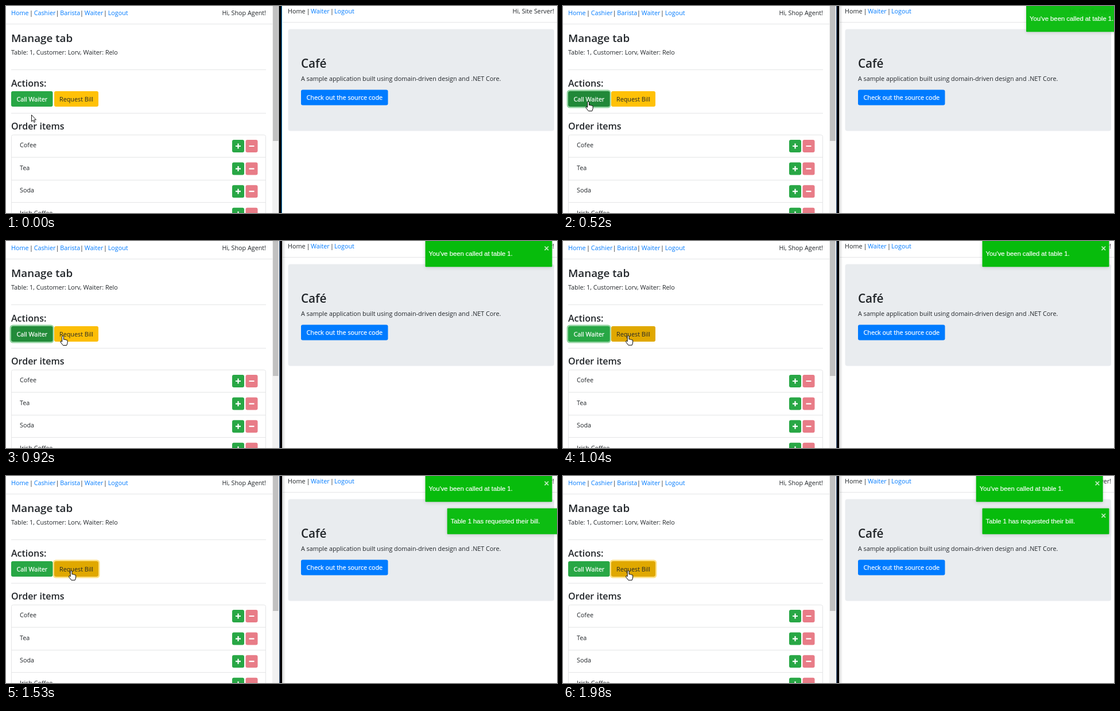
Animation, 960 px wide and 362 px high, one loop 2060 ms. Source, as an HTML page:

```html
<!DOCTYPE html>
<html lang="en">
<head>
<meta charset="utf-8">
<title>Café notifications</title>
<style>
  html, body { margin: 0; width: 100%; height: 100%; overflow: hidden; background: #fff; }
  svg { display: block; width: 960px; height: 362px; }
  text { font: 10.78px "Open Sans", "Noto Sans", sans-serif; fill: #212529; white-space: pre; }
  .h { font-weight: 600; }
  .h3 { font-size: 18.8px; }
  .h4 { font-size: 16px; }
  .h2 { font-size: 20.7px; }
  .link { fill: #007bff; }
  .light { fill: #fff; stroke: #fff; stroke-width: .25; }
  .end { text-anchor: end; }
  .mid { text-anchor: middle; }
  .rule { stroke: #e4e5e6; fill: none; }
  .toast { filter: drop-shadow(0 1px 3px rgba(0, 0, 0, .16)); }
  .toast text { font: 11.25px "Liberation Sans", Arial, sans-serif; fill: #fff; stroke: #fff; stroke-width: .2; }
  .toast path { stroke: #fff; stroke-width: 1.7; opacity: .75; }
  .cursor path { fill: #fff; stroke: #000; stroke-width: .9; stroke-linejoin: round; }
</style>
</head>
<body>
<svg viewBox="0 0 960 362">
  <linearGradient id="shade">
    <stop stop-opacity=".18"/>
    <stop offset="1" stop-opacity="0"/>
  </linearGradient>
  <rect width="960" height="362" fill="#fff"/>

  <!-- customer window -->
  <g id="leftNav"></g>
  <text class="end" x="453" y="16">Hi, Shop Agent!</text>
  <path class="rule" d="M0 31.5H464M9 111.5H453M9 187.5H453"/>
  <text class="h h3" x="9" y="63">Manage tab</text>
  <text x="9" y="85">Table: 1, Customer: Lorv, Waiter: Relo</text>
  <text class="h h4" x="9" y="140.5">Actions:</text>
  <rect id="callRing" x="7.8" y="147.8" width="74.4" height="29.4" rx="4" fill="none" stroke="#28a745" stroke-width="2.4"/>
  <rect id="billRing" x="82.8" y="147.8" width="79.4" height="29.4" rx="4" fill="none" stroke="#ffc107" stroke-width="2.4"/>
  <rect id="call" x="9" y="149" width="72.5" height="27" rx="3"/>
  <rect id="bill" x="84" y="149" width="77" height="27" rx="3"/>
  <text class="light mid" x="45.3" y="167">Call Waiter</text>
  <text class="mid" x="122.5" y="167">Request Bill</text>
  <text class="h h4" x="9" y="216">Order items</text>
  <rect class="rule" x="9.5" y="225.5" width="443" height="160" rx="3"/>
  <g id="items"></g>
  <rect x="464" width="13" height="362" fill="#f1f1f1"/>
  <rect x="465" width="9.5" height="236" fill="#c1c1c1"/>

  <!-- waiter window -->
  <g id="rightNav"></g>
  <text class="end" x="955" y="13">Hi, Site Server!</text>
  <path class="rule" d="M482 28.5H960"/>
  <rect x="491.5" y="40.5" width="463.5" height="178" rx="4" fill="#e9ecef"/>
  <text class="h h2" x="514" y="108">Café</text>
  <text x="514" y="131">A sample application built using domain-driven design and .NET Core.</text>
  <rect x="514" y="146.5" width="151.5" height="27" rx="3" fill="#007bff"/>
  <text class="light mid" x="589.8" y="164">Check out the source code</text>

  <rect id="shadow" x="481" width="6" height="362" fill="url(#shade)"/>
  <rect id="gap" width="4.5" height="362"/>
  <rect id="edge" width="1" height="362"/>

  <g id="toast1" class="toast">
    <rect y="-1" width="221" height="46.3" rx="1" fill="#07bc0c"/>
    <text x="6" y="26">You've been called at table 1.</text>
    <path d="m208 9.5 6.6 6.6m0-6.6-6.6 6.6"/>
  </g>
  <g id="toast2" class="toast">
    <rect y="56.5" width="221" height="45.3" rx="1" fill="#07bc0c"/>
    <text x="6" y="82.5">Table 1 has requested their bill.</text>
    <path d="m208 66 6.6 6.6m0-6.6-6.6 6.6"/>
  </g>

  <circle id="press" r="8" fill="#ffff00" opacity=".55"/>
  <g id="cursor" class="cursor">
    <path id="arrow" d="M0 0V11.5L2.7 9.2 4.4 13 6.2 12.2 4.5 8.5H8Z"/>
    <path id="hand" transform="translate(.6 .4) scale(1.1)" d="M-1.3 9V1a1.3 1.3 0 0 1 2.6 0V5.6q1.2-.9 2.2.3 1.2-.7 2 .5 1.8-.5 1.8 1.2V11L6 14.8H.3L-3.6 9.8Q-4.2 8-2.6 8Z"/>
  </g>
</svg>
<script>
const $ = id => document.getElementById(id);
const LOOP = 2060, SCALE = .711, REST_X = 730.5;

// Page furniture
function nav(id, y, links, bars) {
  $(id).innerHTML =
    links.map(([x, label, plain]) => `<text class="${plain ? '' : 'link'}" x="${x}" y="${y}">${label}</text>`).join('') +
    bars.map(x => `<text class="mid" x="${x}" y="${y}">|</text>`).join('');
}
nav('leftNav', 16, [[9, 'Home'], [48.7, 'Cashier'], [94.3, 'Barista'], [136.7, 'Waiter'], [177.7, 'Logout']],
  [44, 89.8, 132, 173]);
nav('rightNav', 13, [[491, 'Home', true], [531, 'Waiter'], [572, 'Logout']], [526.5, 568]);

$('items').innerHTML = ['Cofee', 'Tea', 'Soda', 'Irish Coffee'].map((name, i) => {
  const y = 225 + i * 39.6;
  return `<text x="24" y="${y + 22}">${name}</text>
    <path class="rule" d="M9 ${Math.round(y + 39) + .5}H453"/>
    <rect x="394" y="${y + 9}" width="21" height="22" rx="3" fill="#28a745"/>
    <rect x="417.5" y="${y + 9}" width="21" height="22" rx="3" fill="#e87c87"/>
    <path d="M400 ${y + 20}h9m-4.5-4.5v9M423.5 ${y + 20}h9" stroke="#fff" stroke-width="2.2"/>`;
}).join('');

// Motion helpers
const linear = p => p;
const smooth = p => p * p * (3 - 2 * p);

function bezier(x1, y1, x2, y2) {
  const at = (s, a, b) => 3 * s * (1 - s) ** 2 * a + 3 * s * s * (1 - s) * b + s ** 3;
  return p => {
    let lo = 0, hi = 1;
    for (let i = 0; i < 20; i++) {
      const mid = (lo + hi) / 2;
      at(mid, x1, x2) < p ? lo = mid : hi = mid;
    }
    return at(lo, y1, y2);
  };
}
const ease = bezier(.25, .1, .25, 1);
const easeOut = bezier(.215, .61, .355, 1);

// Keys are [time, ...values]; returns the values at time t.
function track(t, keys, fn = linear) {
  const i = keys.findIndex(k => k[0] > t);
  if (i === 0) return keys[0].slice(1);
  if (i < 0) return keys[keys.length - 1].slice(1);
  const a = keys[i - 1], b = keys[i], p = fn((t - a[0]) / (b[0] - a[0]));
  return a.slice(1).map((v, j) => v + (b[j + 1] - v) * p);
}

function stepped(t) {
  const start = t < 1250 ? 0 : t < 1940 ? 1250 : 1940;
  return Math.min(start + Math.floor((t - start) / 40) * 40, 1980);
}

const GREEN = [40, 167, 69], GREEN_HOVER = [33, 136, 56], GREEN_DOWN = [30, 126, 52];
const YELLOW = [255, 193, 7], YELLOW_HOVER = [224, 168, 0], YELLOW_DOWN = [211, 158, 0];
const callKeys = [[160, ...GREEN], [250, ...GREEN_HOVER], [360, ...GREEN_HOVER], [420, ...GREEN_DOWN],
  [500, ...GREEN_HOVER], [910, ...GREEN_HOVER], [1000, ...GREEN]];
const billKeys = [[910, ...YELLOW], [1000, ...YELLOW_HOVER], [1240, ...YELLOW_HOVER],
  [1300, ...YELLOW_DOWN], [1340, ...YELLOW_DOWN], [1420, ...YELLOW_HOVER]];
const cursorKeys = [[30, 44.5, 190.5], [280, 43.5, 167], [680, 43.5, 167], [1020, 113, 165.5]];

function bounceIn(t, start, span = 450) {
  const keys = [[0, 3000, 0], [.6, -25, 1], [.75, 10, 1], [.9, -5, 1], [1, 0, 1]];
  return track((t - start) / span, keys, easeOut);
}

function place(id, [shift, opacity]) {
  $(id).setAttribute('transform', `translate(${REST_X + shift * SCALE})`);
  $(id).setAttribute('opacity', opacity);
}

function draw(t) {
  $('call').setAttribute('fill', `rgb(${track(t, callKeys)})`);
  $('bill').setAttribute('fill', `rgb(${track(t, billKeys)})`);
  $('callRing').setAttribute('opacity', track(t, [[360, 0], [450, .5], [1240, .5], [1320, 0]])[0]);
  $('billRing').setAttribute('opacity', track(t, [[1240, 0], [1320, .5]])[0]);

  // The window in front owns the coloured edge and casts the shadow.
  const leftActive = t >= 340;
  $('gap').setAttribute('x', leftActive ? 476.5 : 475.5);
  $('edge').setAttribute('x', leftActive ? 476.5 : 480);
  $('edge').setAttribute('fill', leftActive ? '#123f73' : '#1883d7');
  $('shadow').style.display = leftActive ? '' : 'none';

  const [x, y] = track(t, cursorKeys, smooth);
  const pointing = y < 176;
  $('cursor').setAttribute('transform', `translate(${x} ${y})`);
  $('arrow').style.display = pointing ? 'none' : '';
  $('hand').style.display = pointing ? '' : 'none';

  const pressed = t >= 330 && t < 420 || t >= 1250 && t < 1320;
  $('press').style.display = pressed ? '' : 'none';
  $('press').setAttribute('cx', x);
  $('press').setAttribute('cy', y);

  place('toast1', t < 1911 ? bounceIn(t, 338) : track(t, [[1911, 0, 1], [2061, -20, 1]], ease));
  place('toast2', bounceIn(t, 1330));
}

const began = performance.now();
function tick() {
  draw(stepped((performance.now() - began) % LOOP));
  requestAnimationFrame(tick);
}
tick();
</script>
</body>
</html>
```
